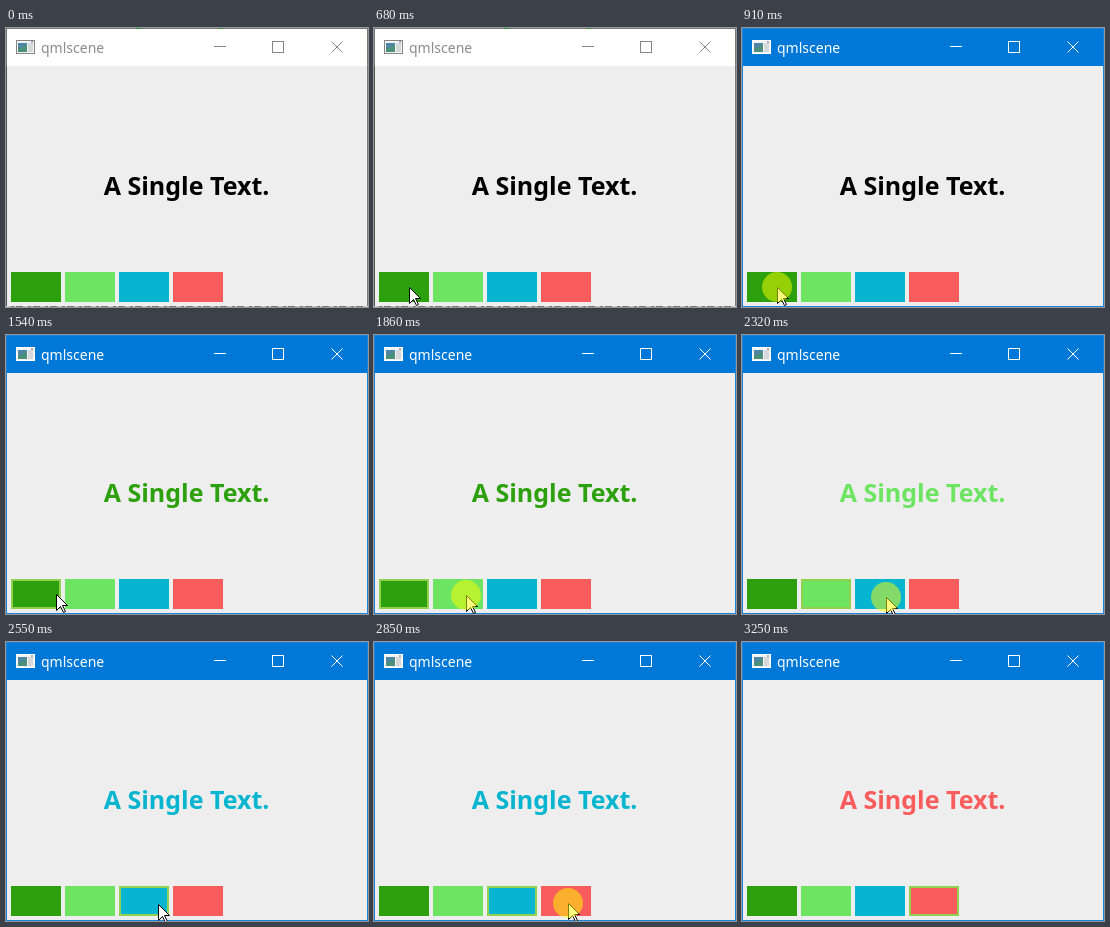
An HTML page for the animation above (3.55 s loop, 362 px wide and 279 px high).

```html
<!DOCTYPE html>
<html lang="en">
<head>
<meta charset="utf-8">
<title>Colour picker</title>
<style>
  html, body { margin: 0; width: 100%; height: 100%; overflow: hidden; }
  svg { display: block; width: 362px; height: 279px; --bar: #fff; --ink: #8c8c8c; --edge: #777a73; --glyph: #858585; }
  svg.active { --bar: #0078d7; --ink: #fff; --edge: #1a82d8; --glyph: #fff; }
  text { font-family: "Noto Sans", "Open Sans", sans-serif; }
  .active .desktop { display: none; }
  .buttons { fill: none; stroke: var(--glyph); }
  #swatches rect { stroke: #92d050; stroke-width: 0; }
</style>
</head>
<body>
<svg id="stage" viewBox="0 0 362 279">
  <rect width="362" height="279" fill="var(--edge)"/>
  <g class="desktop" fill="none">
    <path d="M.5 38V279" stroke="#50564b"/>
    <path d="M0 278.5H362" stroke="#c9cbc6" stroke-dasharray="5 3 2 7"/>
    <path d="M130 .5h5M213 .5h4" stroke="#2f8a35"/>
  </g>
  <rect x="1" y="1" width="360" height="37" fill="var(--bar)"/>
  <rect x="1" y="38" width="360" height="240" fill="#eee"/>

  <rect x="10.5" y="12.5" width="18" height="13" fill="#f4f4f4" stroke="var(--glyph)"/>
  <rect x="12" y="15" width="9" height="9" fill="#4f86a5"/>
  <path d="M12 24v-3l9-4v7z" fill="#4d9079"/>
  <path d="M22 15h5v9h-5z" fill="#d5d9dc"/>
  <path d="M25 14h2" stroke="#667"/>
  <text x="35" y="25" font-size="14" fill="var(--ink)">qmlscene</text>
  <g class="buttons">
    <path d="M208 18.5h12"/>
    <rect x="266.5" y="13.5" width="11" height="11"/>
    <path d="M325.5 13.5l11 11m0-11l-11 11"/>
  </g>

  <text id="label" x="180.5" y="167" font-size="25" font-weight="700" text-anchor="middle">A Single Text.</text>
  <g id="swatches"></g>
  <g id="cursor">
    <path d="M.5 .5V16.5L4.5 12.5 7.5 18.5 9.5 17.5 6.5 11.5H11.5Z" fill="#fff" stroke="#000"/>
    <circle id="halo" r="15" fill="#ff0" fill-opacity=".5"/>
  </g>
</svg>
<script>
const LOOP = 3550, STEP = 76;
const colors = ['#2ca00d', '#6de562', '#07b5d0', '#f95c5c'];
// [press, release] for each swatch
const clicks = [[910, 1080], [1860, 1930], [2320, 2470], [2850, 2930]];
// [start, steps, from x, from y, to x, to y]
const moves = [
  [300, 6, 62, 278, 35, 259],
  [1540, 3, 35, 259, 92, 260],
  [2010, 4, 92, 260, 144, 262],
  [2547, 4, 144, 262, 194, 261],
  [3100, 3, 194, 261, 200, 281]
];
const [stage, label, swatches, cursor, halo] =
  ['stage', 'label', 'swatches', 'cursor', 'halo'].map(id => document.getElementById(id));

const boxes = colors.map(color => {
  const box = document.createElementNS('http://www.w3.org/2000/svg', 'rect');
  box.setAttribute('fill', color);
  return swatches.appendChild(box);
});

function selectBox(box, i, on) {
  const inset = on ? 1 : 0;
  const attrs = { x: 5 + 54 * i + inset, y: 244 + inset, width: 50 - 2 * inset, height: 30 - 2 * inset };
  for (const name in attrs) box.setAttribute(name, attrs[name]);
  box.style.strokeWidth = on ? 2 : 0;
}

function cursorAt(t) {
  const move = moves.filter(m => t >= m[0]).pop();
  if (!move || t >= 3250) return null;
  const [start, steps, x0, y0, x1, y1] = move;
  const p = Math.min(1, (Math.floor((t - start) / STEP + 0.05) + 1) / steps);
  const e = p * p * (3 - 2 * p);
  return [Math.round(x0 + (x1 - x0) * e), Math.round(y0 + (y1 - y0) * e)];
}

function draw(t) {
  const selected = clicks.filter(c => t >= c[1]).length - 1;
  const pos = cursorAt(t);
  stage.classList.toggle('active', t >= clicks[0][0]);
  label.setAttribute('fill', colors[selected] || '#000');
  boxes.forEach((box, i) => selectBox(box, i, i === selected));
  cursor.style.display = pos ? '' : 'none';
  if (pos) cursor.setAttribute('transform', `translate(${pos})`);
  halo.style.display = clicks.some(([down, up]) => t >= down && t < up) ? '' : 'none';
}

const begin = performance.now();
function tick() {
  draw((performance.now() - begin) % LOOP);
  requestAnimationFrame(tick);
}
tick();
</script>
</body>
</html>
```
